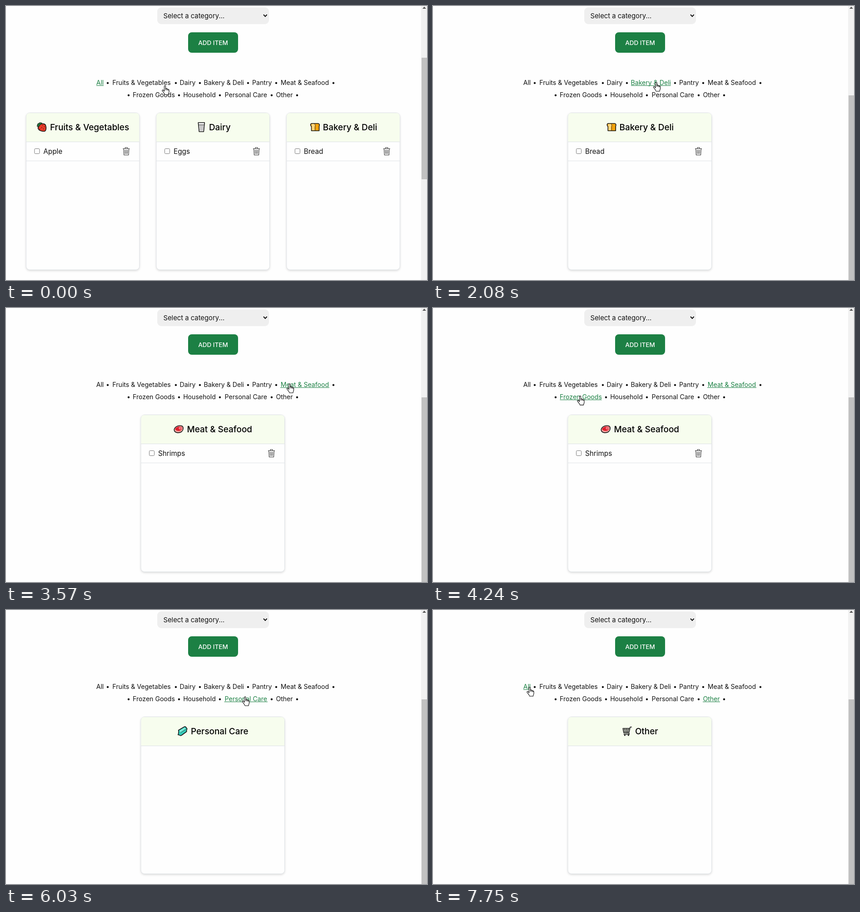
Recreate the animation shown at these times as an HTML page. Size 927 px wide and 604 px high, loop 8 s.

```html
<!DOCTYPE html>
<html lang="en">
<head>
<meta charset="utf-8">
<title>Grocery list</title>
<style>
html, body { margin: 0; height: 100%; overflow: hidden; background: #fefefe; }
svg { display: block; width: 927px; height: 604px; font: 400 14.1px Inter, "Open Sans", sans-serif; }
text { fill: #111; white-space: pre; }
.mid { text-anchor: middle; }
.field { font-size: 14.8px; }
.button { font-size: 13.5px; font-weight: 500; fill: #fff; }
.title { font-size: 18.9px; font-weight: 500; fill: #000; }
.item { font-size: 15.3px; }
.link line { stroke: none; }
.on text { fill: #1c8044; }
.on line { stroke: #1c8044; }
.card { fill: #fefefe; stroke: #dee2e6; filter: drop-shadow(0 2px 2px rgba(0, 0, 0, .13)); }
.ink { fill: none; stroke: #161616; stroke-width: 1.6; stroke-linejoin: round; stroke-linecap: round; }
</style>
</head>
<body>
<svg viewBox="0 0 927 604">
  <rect width="927" height="604" fill="#fefefe"/>
  <rect x="333" y="3" width="246" height="37" rx="9" fill="#efefef"/>
  <text class="field" x="346.5" y="26.5">Select a category...</text>
  <path d="M567 19l3.8 4 3.8-4" fill="none" stroke="#111" stroke-width="2"/>
  <rect x="401" y="58" width="110" height="45" rx="8" fill="#1c8044"/>
  <text class="button mid" x="456" y="85.5">ADD ITEM</text>
  <g id="links"></g>
  <g id="cards"></g>
  <rect x="914" width="13" height="604" fill="#f1f1f1"/>
  <path d="M917 6l4-4.5 4 4.5z" fill="#505050"/>
  <rect id="thumb" x="915" width="12" fill="#c1c1c1"/>
  <circle id="click" r="12" fill="#faee00" fill-opacity=".65"/>
  <g id="cursor" fill="#fff" stroke="#000" stroke-width="1.1" stroke-linejoin="round">
    <g id="hand" transform="translate(-7 -.5)">
      <path d="M5.5 13V2a1.5 1.5 0 0 1 3 0V7.6a1.45 1.45 0 0 1 2.8.3V8.4a1.4 1.4 0 0 1 2.6.5V9.4a1.2 1.2 0 0 1 2.1 1V14.5c0 2.4-1.5 3-1.5 6H6.6C6.2 17.6 3.5 15.5 1 12a1.5 1.5 0 0 1 2.3-1.7z"/>
      <path d="M8.5 7.6v3M11.3 8.4v2.6M13.9 9.4v2" fill="none"/>
    </g>
    <path id="arrow" d="M0 0V16.5L3.8 13 6.4 18.8 8.8 17.7 6.3 12.1H11.6z"/>
  </g>
</svg>
<script>
const $ = id => document.getElementById(id);
const LOOP = 8000;

// label, left, right, row
const links = [
  ["All", 199, 215, 0], ["Fruits & Vegetables", 233, 364, 0], ["Dairy", 382.5, 417.5, 0],
  ["Bakery & Deli", 436, 523.5, 0], ["Pantry", 542, 585.5, 0], ["Meat & Seafood", 604, 712, 0],
  ["Frozen Goods", 279.5, 371.5, 1], ["Household", 390, 462, 1],
  ["Personal Care", 480.5, 576, 1], ["Other", 594, 632, 1]
];
const bullets = [[224, 374, 427, 533, 595, 721], [270, 381, 471, 585, 641]];

const shape = (d, fill = "none", width = 1.6) =>
  `<path class="ink" d="${d}" style="fill:${fill};stroke-width:${width}"/>`;
const fill = (d, color) => `<path d="${d}" fill="${color}"/>`;

const icons = {
  berry: shape("M-5-5C0-9 8-8 9-3C11 3 9 8 7 9C2 10-7 8-8 2Q-8-2-5-5z", "#e93a28") +
    shape("M-10-2L-9-7-4-10 1-9-1-6-4-5-6-1z", "#22703a", 1) +
    shape("M2-4h.2M6-1h.2M0 1h.2M4 4h.2M-4 4h.2", "none", 1.4),
  milk: shape("M-7-10H7L5 10H-5z", "#f4f4f4") + fill("M-5-4H5L4 8H-4z", "#c8c8c8") +
    shape("M-6-5H6", "none", 1),
  bread: shape("M-8-8H7Q11-7 9-2V8H-8V-1Q-12-6-8-8z", "#f2a30b") +
    fill("M-7-7H-1Q1-4-1-1V7H-7V-2Q-9-5-7-7z", "#ffd77f") + shape("M-1-7Q2-4 0-1V7", "none", .8),
  can: shape("M-6-8Q0-11 6-8V8Q0 11-6 8z", "#d94435") + fill("M-5-7H5V-4H-5zM-5 5H5V8H-5z", "#c9ccd0"),
  meat: shape("M-10 1C-8-7 2-9 7-7C12-4 10 3 6 6C1 9-10 9-10 1z", "#f3a6a0") +
    fill("M-8 0C-6-5 2-7 6-5C9-3 7 2 4 3C0 5-6 4-8 0z", "#e01f2d") +
    '<ellipse cx="3.5" cy="-2" rx="2.5" ry="2" fill="none" stroke="#fff"/>',
  ice: shape("M5-5L9-10", "none", 2.4) + shape("M-9-1C-9-10 8-10 9-1z", "#f2887c") +
    shape("M-9-1H9Q8 5 3 6L5 10H-5L-3 6Q-8 5-9-1z", "#f3f3f3") + fill("M-7-2Q0-7 7-2z", "#fff"),
  paper: shape("M-7-7H5V9H-7z", "#f5f5f5") +
    '<ellipse class="ink" cx="5" cy="-4" rx="4" ry="4.5" style="fill:#ddd"/>',
  soap: shape("M-9-2L3-9Q6-11 8-8L10-5Q8-2 9 1L-2 9Q-4 11-6 9L-10 8Q-8 4-9-2z", "#35cdbb") +
    fill("M-7-1L4-8 7-5-4 3z", "#7be9d9") + shape("M-4 3L7-4", "#0000", .7),
  cart: shape("M10-9H7L4 4H-7L-9-6H6M-7 7H5L4 4") +
    shape("M-8-3H5M-8 1H4M-5-6L-4 4M-1-6V4M3-6L1 4", "none", 1.2) +
    shape("M-5 9h.2M3 9h.2", "none", 3)
};

// icon, icon offset from the card centre, item
const stock = [, ["berry", -90.5, "Apple"], ["milk", -25.5, "Eggs"], ["bread", -62, "Bread"],
  ["can", -34, "Pasta"], ["meat", -75, "Shrimps"], ["ice", -64, "Ice Cream"],
  ["paper", -55], ["soap", -66.5], ["cart", -28]];

// pressed, category, card swapped, highlight gone
const clicks = [
  [340, 1, 410, 440], [1180, 2, 1250, 1280], [1850, 3, 1920, 1920], [2590, 4, 2660, 2690],
  [3440, 5, 3510, 3540], [4440, 6, 4510, 4540], [5250, 7, 5320, 5350],
  [5970, 8, 6030, 6030], [6820, 9, 6890, 6920]
];

// pointer: time, x, y
const path = [
  [0, 350, 175.5], [140, 340.5, 170], [640, 340.5, 170], [980, 397.5, 168],
  [1430, 397.5, 168], [1680, 479.5, 167.5], [2050, 479.5, 167.5], [2080, 491.5, 168],
  [2420, 566, 166.5], [2820, 566, 166.5], [3320, 627, 166.5], [3540, 627, 166.5],
  [3570, 624.5, 167], [4270, 322.5, 194], [4670, 322.5, 194], [5060, 437.5, 193],
  [5430, 437.5, 193], [5830, 526.5, 191], [6100, 526.5, 191], [6720, 607, 190.5],
  [6930, 607, 190.5], [7730, 213, 170], [LOOP, 213, 170]
];

const esc = s => s.replace("&", "&amp;");
const baseline = row => 174 + 27 * row;

$("links").innerHTML = links.map(([label, a, b, row]) =>
  `<g class="link"><text class="mid" x="${(a + b) / 2}" y="${baseline(row)}">${esc(label)}</text>
   <line x1="${a}" x2="${b}" y1="${baseline(row) + 1.5}" y2="${baseline(row) + 1.5}"/></g>`).join("") +
  bullets.map((xs, row) => xs.map(x =>
    `<text class="mid" x="${x}" y="${baseline(row)}">•</text>`).join("")).join("");
const linkNodes = document.querySelectorAll(".link");

function card(id, x, w) {
  const [icon, dx, item] = stock[id], cx = x + w / 2, bin = x + w - 29;
  const row = item ? `
    <rect x="${x + 18.5}" y="314.5" width="11" height="11" rx="2" fill="#fff" stroke="#767676"/>
    <text class="item" x="${x + 38}" y="325.7">${item}</text>
    <g transform="translate(${bin} 320)" fill="none" stroke="#333" stroke-width="1.1">
      <path d="M-7.5-5.5H7.5M-2.5-5.5V-8H2.5V-5.5M-6-5.5L-5 8.5H5L6-5.5M-3-3L-2.5 6M0-3V6M3-3L2.5 6"/>
    </g>
    <path d="M${x} 341.5h${w}" stroke="#dee2e6"/>` : "";
  return `<rect class="card" x="${x}" y="235.5" width="${w}" height="346" rx="8"/>
    <path d="M${x + .5} 299V243.500q0-7.500 7.500-7.500h${w - 16}q7.500 0 7.500 7.500V299z" fill="#f7fdee"/>
    <path d="M${x} 299.500h${w}" stroke="#dee2e6"/>
    <g transform="translate(${cx + dx} 267)">${icons[icon]}</g>
    <text class="title mid" x="${cx + 15}" y="274">${esc(links[id][0])}</text>${row}`;
}

let shown = -1;
function showCards(id) {
  if (id === shown) return;
  shown = id;
  $("cards").innerHTML = id ? card(id, 297, 316.5)
    : card(1, 44.3, 249.5) + card(2, 331, 249.5) + card(3, 617.8, 249.5);
  $("thumb").setAttribute("y", id ? 197 : 114);
  $("thumb").setAttribute("height", id ? 407 : 268);
}

function pointer(t) {
  const i = path.findIndex(k => k[0] > t), [t0, x0, y0] = path[i - 1], [t1, x1, y1] = path[i];
  const u = (t - t0) / (t1 - t0), e = u * u * (3 - 2 * u);
  return [x0 + (x1 - x0) * e, y0 + (y1 - y0) * e];
}

function draw(now) {
  const t = now % LOOP, [x, y] = pointer(t);
  const active = clicks.reduce((id, c) => t >= c[2] ? c[1] : id, 0);
  const hover = links.findIndex(([, a, b, row]) =>
    x >= a && x <= b && Math.abs(y + 1 - 169 - 27 * row) < 11);
  showCards(active);
  linkNodes.forEach((n, i) =>
    n.classList.toggle("on", i === active || (i === hover && t >= 30)));
  const place = `translate(${x} ${y})`;
  $("cursor").setAttribute("transform", place);
  $("hand").style.display = hover < 0 ? "none" : "";
  $("arrow").style.display = hover < 0 ? "" : "none";
  $("click").setAttribute("transform", `translate(${x} ${y + 2})`);
  $("click").style.display = clicks.some(c => t >= c[0] && t < c[3]) ? "" : "none";
}

const start = performance.now();
function tick() {
  draw(performance.now() - start);
  requestAnimationFrame(tick);
}
tick();
</script>
</body>
</html>
```
